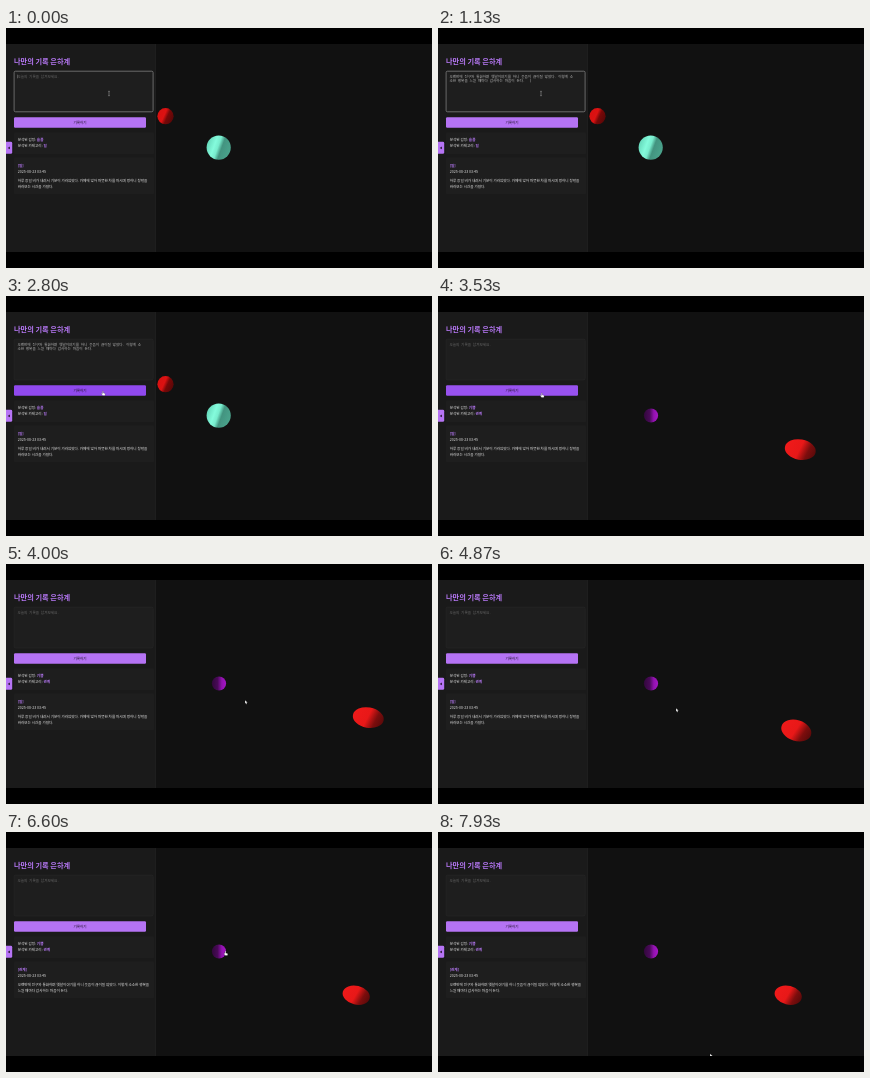
Animation of 426x240 px, one loop 8 s. Source, as an HTML page:

```html
<!DOCTYPE html>
<html>
<head>
<meta charset="utf-8">
<title>나만의 기록 은하계</title>
<style>
  html, body { margin: 0; width: 100%; height: 100%; overflow: hidden; background: #000; }
  svg { display: block; width: 426px; height: 240px; }
  text { font: 3.6px "Noto Sans CJK KR", "Noto Sans", sans-serif; fill: #e4e4e4; white-space: pre; }
  .mono { font-family: "Noto Sans Mono CJK KR", "Noto Sans CJK KR", monospace; fill: #b4b4b4; }
  .hint { fill: #686868; }
  .body { font-weight: 500; }
  .accent { fill: #b778f6; font-weight: 700; }
  .title { font-size: 7.2px; }
</style>
</head>
<body>
<svg viewBox="0 0 426 240">
  <defs>
    <linearGradient id="redShade" x1="0.05" y1="0.3" x2="0.95" y2="0.7">
      <stop offset="0" stop-color="#d81010"/>
      <stop offset=".4" stop-color="#dc1212"/>
      <stop offset=".62" stop-color="#770808"/>
      <stop offset="1" stop-color="#5c0707"/>
    </linearGradient>
    <linearGradient id="farShade" x1="0" y1="0.4" x2="1" y2="0.6">
      <stop offset="0" stop-color="#f01a1a"/>
      <stop offset=".48" stop-color="#e81818"/>
      <stop offset=".75" stop-color="#7c0d0d"/>
      <stop offset="1" stop-color="#5a0a0a"/>
    </linearGradient>
    <linearGradient id="tealShade" x1="0.03" y1="0.33" x2="0.97" y2="0.67">
      <stop offset="0" stop-color="#66d9bb"/>
      <stop offset=".3" stop-color="#84fbdc"/>
      <stop offset=".46" stop-color="#78eccd"/>
      <stop offset=".62" stop-color="#439480"/>
      <stop offset="1" stop-color="#4aa38c"/>
    </linearGradient>
    <linearGradient id="violetShade">
      <stop offset="0" stop-color="#32073c"/>
      <stop offset=".4" stop-color="#480a57"/>
      <stop offset=".7" stop-color="#9312b0"/>
      <stop offset="1" stop-color="#a616c6"/>
    </linearGradient>
  </defs>

  <rect y="16" width="426" height="208" fill="#111"/>
  <g id="before">
    <circle cx="159.5" cy="88.2" r="8.1" fill="url(#redShade)"/>
    <circle cx="212.7" cy="119.6" r="12.1" fill="url(#tealShade)"/>
  </g>
  <g id="after">
    <circle cx="213" cy="119.5" r="7.1" fill="url(#violetShade)"/>
    <ellipse id="far" fill="url(#farShade)"/>
  </g>

  <rect y="16" width="149" height="208" fill="#1a1a1a"/>
  <rect x="149" y="16" width=".6" height="208" fill="#292929"/>
  <text class="accent title" x="8" y="36.2">나만의 기록 은하계</text>

  <rect id="field" x="8.1" y="43.2" width="139" height="40.6" rx="1.4" fill="#1e1e1e" stroke-width=".7"/>
  <text id="hint" class="mono hint" x="11.4" y="49.9">오늘의 기록을 남겨보세요.</text>
  <g id="draft">
    <text class="mono" x="11.4" y="49.9">오랜만에 친구와 통화하며 옛날이야기를 하니 웃음이 끊이질 않았다. 이렇게 소</text>
    <text class="mono" x="11.4" y="54">소한 행복을 느낄 때마다 감사하는 마음이 든다.</text>
  </g>
  <rect id="caret" width=".3" height="3.6" fill="#ccc"/>

  <rect id="button" x="8" y="89.3" width="132" height="10.5" rx="1.2"/>
  <text x="74" y="95.9" text-anchor="middle" style="fill:#201428">기록하기</text>

  <rect x="8" y="104.6" width="140" height="21.4" rx="1.2" fill="#1e1e1e"/>
  <text class="body" x="11.7" y="113">분석된 감정: <tspan id="mood" class="accent"></tspan></text>
  <text class="body" x="11.7" y="119.4">분석된 카테고리: <tspan id="topic" class="accent"></tspan></text>

  <rect x="8" y="129.6" width="140" height="36.4" rx="1.2" fill="#1e1e1e"/>
  <text id="tag" class="accent" x="11.7" y="138.9"></text>
  <text x="11.7" y="144.7">2025-08-23 03:45</text>
  <text id="line1" class="body" x="11.7" y="154.3"></text>
  <text id="line2" class="body" x="11.7" y="159.9"></text>

  <path d="M0 113.8h4.8q1.4 0 1.4 1.4v9.2q0 1.4-1.4 1.4H0z" fill="#b674f5"/>
  <path d="M3.9 118.5v2.8L1.7 119.9z" fill="#27182f"/>

  <g id="pointer">
    <path id="beam" d="M-.9-2.2h.7l.2.3.2-.3h.7M0-1.9v3.8M-.9 2.2h.7l.2-.3.2.3h.7" fill="none" stroke="#bbb" stroke-width=".45"/>
    <path id="hand" d="M-.5-1.8q.5-.5.9 0V0l1.5.4q.5.2.4.8L1.9 2.6H-.3L-1.7.7q0-.6.6-.5l.6.4z" fill="#fff" stroke="#222" stroke-width=".25"/>
    <path id="arrow" d="M-1-1.7v3.4l.8-.7.6 1.2.7-.3-.6-1.2 1.1-.1z" fill="#fff" stroke="#000" stroke-width=".2"/>
  </g>
  <rect y="224" width="426" height="16" fill="#000"/>
</svg>
<script>
const LOOP = 8000, PASTE = 400, CLICK = 2530, RESULT = 2930, OPEN = 6470;
const $ = id => document.getElementById(id);
const show = (id, on) => { $(id).style.display = on ? "" : "none"; };
const write = (id, s) => { if ($(id).textContent !== s) $(id).textContent = s; };
const set = (id, attrs) => { for (const k in attrs) $(id).setAttribute(k, attrs[k]); };

// Rows: time, then values
const pointerPath = [
  [0, 103, 65.5], [1530, 103, 65.5], [1930, 98, 97], [2200, 97, 97], [3470, 97, 97],
  [3930, 240, 138], [4200, 240, 138], [4870, 239, 146], [5870, 237, 144],
  [6400, 219.5, 121], [6800, 219.5, 121], [7600, 250, 186], [7930, 273, 223.5]
];
// cx, cy, rx, ry, tilt
const farPath = [
  [4200, 362.3, 153.6, 15.6, 10.2, 10], [4870, 358.3, 166.5, 15.4, 10.4, 17],
  [5870, 350.2, 163.2, 13.8, 9.4, 14]
];
const hoverPath = [[1860, 181, 115, 244], [2160, 144, 73, 238], [3470, 144, 73, 238], [3670, 181, 115, 244]];
const entries = [
  ["[일]", "하루 종일 비가 내려서 기분이 가라앉았다. 카페에 앉아 따뜻한 차를 마시며 멍하니 창밖을", "바라보는 시간을 가졌다."],
  ["[관계]", "오랜만에 친구와 통화하며 옛날이야기를 하니 웃음이 끊이질 않았다. 이렇게 소소한 행복을", "느낄 때마다 감사하는 마음이 든다."]
];

function sample(path, t) {
  const i = path.findIndex(p => p[0] > t);
  if (i === 0) return path[0].slice(1);
  if (i < 0) return path[path.length - 1].slice(1);
  const a = path[i - 1], b = path[i];
  const u = (t - a[0]) / (b[0] - a[0]), e = u * u * (3 - 2 * u);
  return a.slice(1).map((v, k) => v + (b[k + 1] - v) * e);
}

function draw(t) {
  const done = t >= RESULT, focused = t < CLICK, typed = t >= PASTE && !done;
  show("before", !done);
  show("after", done);
  show("hint", !typed);
  show("draft", typed);
  show("caret", focused && Math.floor(t / 500) % 2 === 0);
  set("caret", typed ? { x: 92.6, y: 50.8 } : { x: 11.2, y: 46.7 });
  set("field", { stroke: focused ? "#8c8c8c" : "#282828" });
  set("button", { fill: `rgb(${sample(hoverPath, t).map(Math.round)})` });

  write("mood", done ? "기쁨" : "슬픔");
  write("topic", done ? "관계" : "일");
  const entry = entries[t >= OPEN ? 1 : 0];
  ["tag", "line1", "line2"].forEach((id, i) => write(id, entry[i]));

  const [cx, cy, rx, ry, tilt] = sample(farPath, t);
  set("far", { cx, cy, rx, ry, transform: `rotate(${tilt} ${cx} ${cy})` });

  const [x, y] = sample(pointerPath, t);
  const inField = x < 148 && y > 43 && y < 84;
  const onButton = x < 140 && y > 89 && y < 100;
  const onPlanet = done && Math.hypot(x - 213, y - 119.5) < 7.5;
  set("pointer", { transform: `translate(${x} ${y})` });
  show("beam", inField);
  show("hand", onButton || onPlanet);
  show("arrow", !inField && !onButton && !onPlanet);
}

const start = performance.now();
(function tick() {
  draw((performance.now() - start) % LOOP);
  requestAnimationFrame(tick);
})();
</script>
</body>
</html>
```
